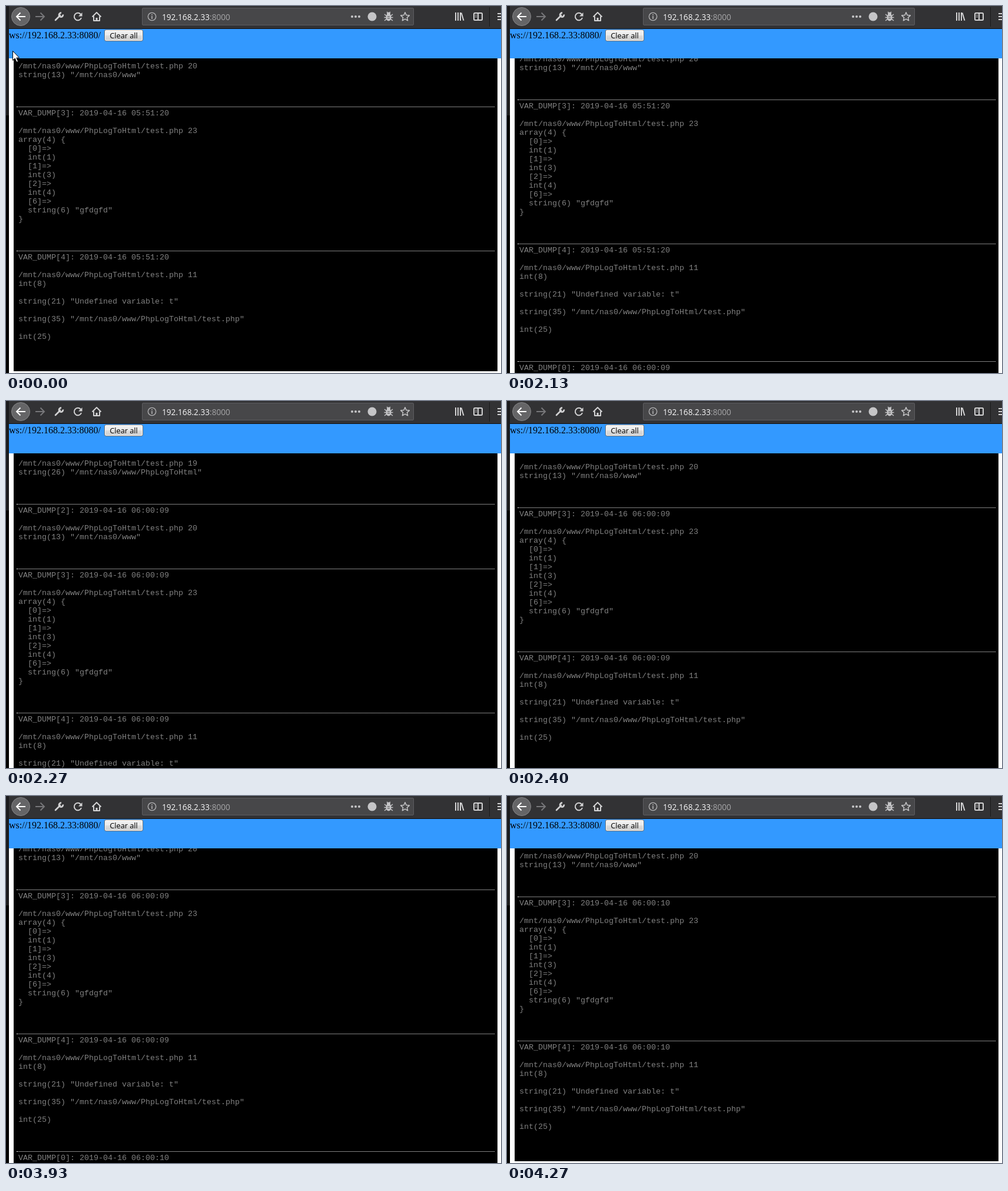
An HTML page that plays this animation: 841 px wide and 624 px high, repeating every 7.27 s.

```html
<!DOCTYPE html>
<html lang="en">
<head>
<meta charset="utf-8">
<title>Log viewer</title>
<style>
  html, body { margin: 0; width: 100%; height: 100%; overflow: hidden; background: #000; }
  .stage { position: relative; width: 841px; height: 624px; overflow: hidden; background: #000; }
  .edge { position: absolute; left: 0; top: 0; width: 5px; height: 186px; background: #1b1b1d; }
  .chrome, .cursor { position: absolute; left: 0; top: 0; }
  .url { font: 13.65px "Open Sans", sans-serif; fill: #f9f9fa; }
  .url .port { fill: #a5a5a7; }

  .bar { position: absolute; left: 5px; top: 39px; width: 836px; height: 50px; background: #39f;
         font: 16px/18px "Liberation Serif", serif; color: #000; }
  .bar span { position: absolute; left: 0; top: 2px; white-space: pre; }
  .bar b { position: absolute; left: 162px; top: 1px; width: 66px; height: 20px; box-sizing: border-box;
           border: 1px solid #707070; border-radius: 3px; box-shadow: inset 0 0 0 1px #fcfcfc;
           background: linear-gradient(#f2f2f2, #ebebeb 50%, #ddd 50%, #cfcfcf);
           font: 12.7px/18px "Open Sans", sans-serif; text-align: center; white-space: pre; }

  .view { position: absolute; left: 5px; top: 89px; width: 836px; height: 535px; overflow: hidden; background: #fff; }
  .log { position: absolute; left: 8px; bottom: 3px; width: 822px; padding: 5px; box-sizing: border-box;
         background: #000; animation: scroll 7270ms step-end infinite; }
  .batch { overflow: hidden; }
  .batch:nth-child(2) { animation: second 7270ms step-end infinite; }
  .batch:nth-child(3) { animation: third 7270ms step-end infinite; }
  pre { margin: 0; padding: 3px 3px 46px; border-top: 1px dotted #fff; color: #808080;
        font: 13.333px/15px "Liberation Mono", monospace; }

  .cursor { animation: cursor 7270ms step-end infinite; }

  @keyframes second { 0% { max-height: 0; } 29.298%, 100% { max-height: 775px; } }
  @keyframes third  { 0% { max-height: 0; } 54.057%, 100% { max-height: 775px; } }
  @keyframes scroll {
    0%, 33.975%, 58.734%, 100% { transform: none; }
    29.298%, 54.057% { transform: translateY(763px); }
    30.261%, 55.020% { transform: translateY(361px); }
    31.224%, 55.983% { transform: translateY(114px); }
    32.049%, 56.808% { transform: translateY(38px); }
    33.012%, 57.771% { transform: translateY(10px); }
  }
  @keyframes cursor {
    0% { transform: none; }
    2.751% { transform: translate(-7px, 8px); }
    4.539%, 100% { transform: translate(0, -200px); }
  }
</style>
</head>
<body>
<div class="stage">
  <div class="edge"></div>

  <svg class="chrome" width="841" height="39" fill="none" stroke="#d2d2d3" stroke-width="2">
    <g stroke="none">
      <path d="M5 0H841V38H5z" fill="#323234"/>
      <path d="M5 38H841V39H5z" fill="#0e0e0f"/>
    </g>
    <circle cx="25" cy="18" r="15.5" fill="#656567" stroke="#858587" stroke-width="1"/>
    <path d="M33 18H18M24.5 11.5L18 18L24.5 24.5" stroke="#fff"/>
    <path d="M50 18H65M58.5 11.5L65 18L58.5 24.5" stroke="#77777a"/>
    <!-- wrench -->
    <path d="M84 24L92 16" stroke-width="2.6" stroke-linecap="round"/>
    <path d="M94 11.8A3.4 3.4 0 1 0 96.8 14.6" stroke-width="2.8"/>
    <!-- reload -->
    <path d="M126.8 14A6.2 6.2 0 1 0 128 20"/>
    <path d="M129.5 11V17.5H123z" fill="#d2d2d3" stroke="none"/>
    <!-- home -->
    <path d="M146.5 18.5L154 11L161.5 18.5M149 17.5V25H159V17.5" stroke-linejoin="round"/>
    <path d="M154 20V25" stroke-width="3"/>

    <rect x="231.5" y="3.5" width="461" height="29" rx="1.5" fill="#474749" stroke="#5d5d60" stroke-width="1"/>
    <circle cx="248" cy="18" r="6.7" stroke="#b4b4b6" stroke-width="1.3"/>
    <path d="M248 17V22M248 14V15.7" stroke="#b4b4b6" stroke-width="1.6"/>
    <text class="url" x="265" y="23.5" stroke="none">192.168.2.33<tspan class="port">:8000</tspan></text>

    <g fill="#c5c5c7" stroke="none">
      <circle cx="588" cy="18" r="2"/><circle cx="594" cy="18" r="2"/><circle cx="600" cy="18" r="2"/>
      <circle cx="622" cy="18" r="7.5"/>
      <ellipse cx="650" cy="19.5" rx="4.5" ry="6"/>
      <circle cx="650" cy="13.5" r="3"/>
    </g>
    <g stroke="#c5c5c7" stroke-width="1.5">
      <path d="M643 14L646 16.5H654L657 14M642.5 19.5H657.5M643 25L646 22.5H654L657 25M647 10L649 12M653 10L651 12"/>
      <path d="M648 18H652M648 21H652" stroke="#474749" stroke-width="1"/>
      <path id="star" stroke-linejoin="round"/>
    </g>

    <!-- library and sidebar -->
    <path d="M764 11V25M768 11V25M772 11V25M773.5 11.5L777.5 24.8"/>
    <rect x="795" y="12" width="14" height="12" rx="1.5"/>
    <path d="M802 12V24"/>
    <path d="M797 15.5H800M797 18.5H800" stroke-width="1"/>
    <path d="M821.5 2V35" stroke="#1a1a1b" stroke-width="1"/>
    <path d="M835 13H841M835 18H841M835 23H841"/>
  </svg>

  <div class="bar"><span>ws://192.168.2.33:8080/</span><b>Clear all</b></div>
  <div class="view"><div class="log" id="log"></div></div>

  <svg class="cursor" width="40" height="120">
    <path d="M11.5 76.5V92.5L15.2 89L17.8 95H20.2V93.5L17.8 88H22.5z" fill="#fff" stroke="#000"/>
  </svg>
</div>

<script>
  const file = "/mnt/nas0/www/PhpLogToHtml/test.php";
  const dumps = [
    [18, 'string(8) "test.php"'],
    [19, 'string(26) "/mnt/nas0/www/PhpLogToHtml"'],
    [20, 'string(13) "/mnt/nas0/www"'],
    [23, `array(4) {
  [0]=>
  int(1)
  [1]=>
  int(3)
  [2]=>
  int(4)
  [6]=>
  string(6) "gfdgfd"
}`],
    [11, `int(8)

string(21) "Undefined variable: t"

string(35) "${file}"

int(25)`]
  ];

  const add = (parent, tag) => parent.appendChild(document.createElement(tag));

  for (const time of ["05:51:20", "06:00:09", "06:00:10"]) {
    const batch = add(document.getElementById("log"), "div");
    batch.className = "batch";
    dumps.forEach(([line, value], i) => {
      add(batch, "pre").textContent = `VAR_DUMP[${i}]: 2019-04-16 ${time}\n\n${file} ${line}\n${value}`;
    });
  }

  const points = Array.from({ length: 10 }, (_, i) => {
    const r = i % 2 ? 3.6 : 7.8, a = (i / 5 - 0.5) * Math.PI;
    return `${(678 + r * Math.cos(a)).toFixed(1)} ${(18.5 + r * Math.sin(a)).toFixed(1)}`;
  });
  document.getElementById("star").setAttribute("d", `M${points.join("L")}z`);
</script>
</body>
</html>
```
